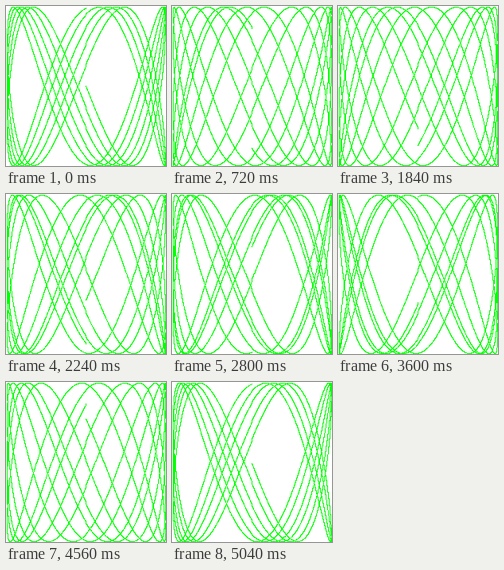
Animation, 201 px wide and 201 px high, one loop 5120 ms. Source, as an HTML page with a canvas:

```html
<!DOCTYPE html>
<html lang="en">
<head>
<meta charset="utf-8">
<title>Lissajous</title>
<style>
  html, body { margin: 0; width: 100%; height: 100%; overflow: hidden; background: #fff; }
  canvas { display: block; width: 201px; height: 201px; image-rendering: pixelated; }
</style>
</head>
<body>
<canvas id="stage" width="201" height="201"></canvas>
<script>
  const RADIUS = 100;
  const SIDE = 2 * RADIUS + 1;
  const CYCLES = 5;
  const FREQ = 2.5452;
  const RES = 0.001;
  const STEPS = 64;
  const STEP_MS = 80;
  const PHASE_STEP = 0.1;
  const WHITE = 0xffffffff;
  const GREEN = 0xff00ff00; // ABGR

  const ctx = document.getElementById('stage').getContext('2d');
  const image = ctx.createImageData(SIDE, SIDE);
  const pixels = new Uint32Array(image.data.buffer);

  // Truncates toward zero, so the curve spans 1..200.
  const toPixel = v => RADIUS + Math.trunc(v * RADIUS + 0.5);

  function draw(phase) {
    pixels.fill(WHITE);
    const end = CYCLES * 2 * Math.PI;
    for (let t = 0; t < end; t += RES) {
      const x = toPixel(Math.sin(t));
      const y = toPixel(Math.sin(t * FREQ + phase));
      pixels[y * SIDE + x] = GREEN;
    }
    ctx.putImageData(image, 0, 0);
  }

  const start = performance.now();
  let shown = -1;

  function tick() {
    const elapsed = performance.now() - start;
    const step = Math.floor(elapsed / STEP_MS) % STEPS;
    if (step !== shown) {
      shown = step;
      draw(step * PHASE_STEP);
    }
    requestAnimationFrame(tick);
  }
  tick();
</script>
</body>
</html>
```
